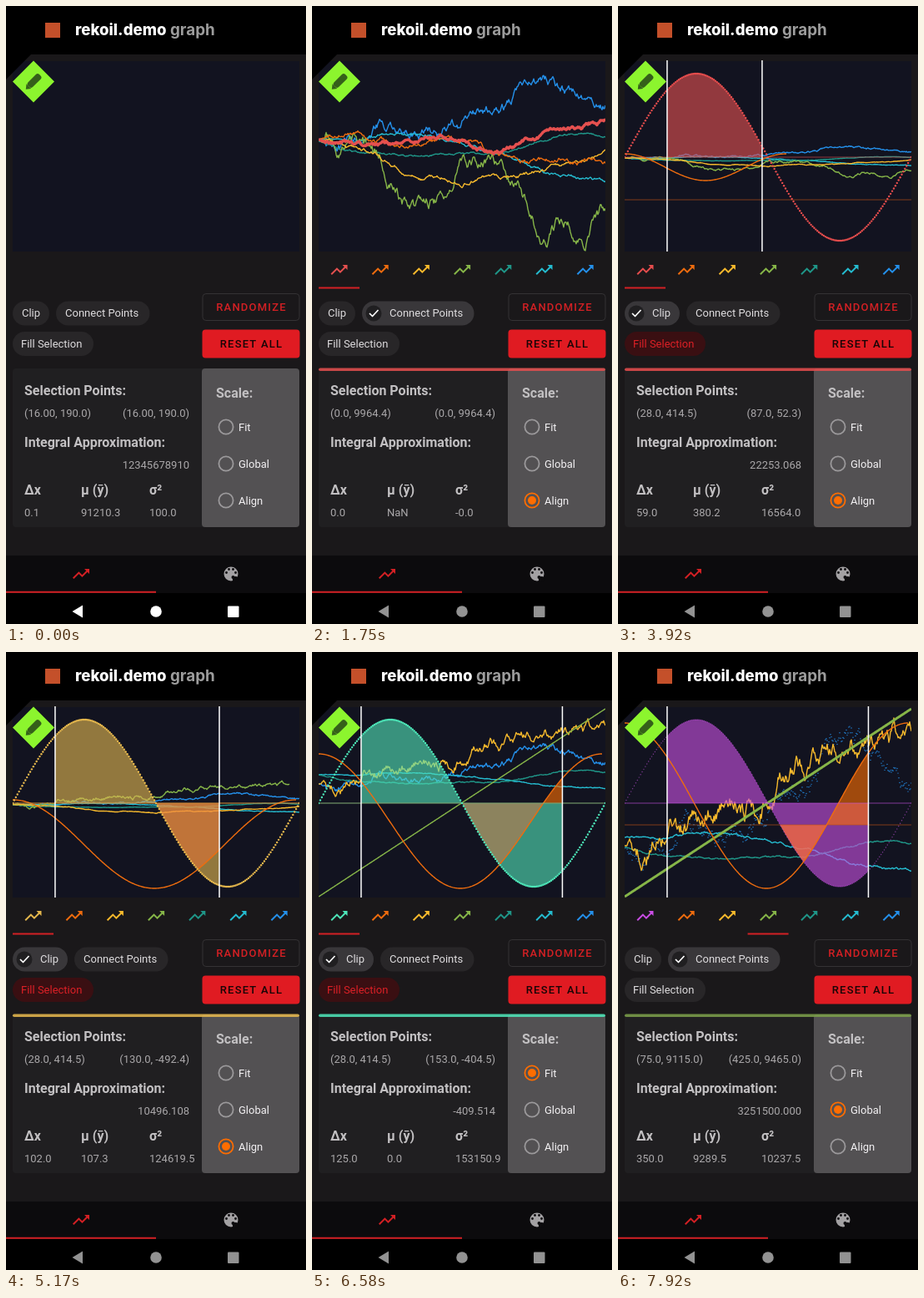
These frames come from a looping animation (360x740 px, 8000 ms). An HTML page with a canvas:

```html
<!DOCTYPE html>
<html lang="en">
<head>
<meta charset="utf-8">
<title>Graph demo</title>
<style>
html, body { margin: 0; width: 100%; height: 100%; overflow: hidden; background: #000; }
canvas { display: block; width: 360px; height: 740px; }
</style>
</head>
<body>
<canvas id="stage"></canvas>
<script>
const canvas = document.getElementById('stage');
const ctx = canvas.getContext('2d');
const dpr = window.devicePixelRatio || 1;
canvas.width = 360 * dpr;
canvas.height = 740 * dpr;

const LOOP = 8000, FPS = 12;
const LEFT = 8, TOP = 66, WIDTH = 344, BOTTOM = 294, MID = 181;
const RED = '#d32024';
const COLORS = ['#e5504f', '#ee6c0e', '#f6b92c', '#86b548', '#1f9688', '#25bcd0', '#2490ea'];
const ARROW = new Path2D('M16 6l2.29 2.29-4.88 4.88-4-4L2 16.59 3.41 18l6-6 4 4 6.3-6.29L22 12V6z');

// linear interpolation through time, value pairs
function key(t, ...k) {
  if (t <= k[0]) return k[1];
  for (let i = 2; i < k.length; i += 2) {
    if (t <= k[i]) return k[i - 1] + (k[i + 1] - k[i - 1]) * (t - k[i - 2]) / (k[i] - k[i - 2]);
  }
  return k[k.length - 1];
}

// random walk that follows evenly spaced knots
function walk(seed, amp, knots) {
  const out = [];
  let s = seed, v = 0;
  for (let i = 0; i <= WIDTH; i++) {
    s = (s * 16807) % 2147483647;
    v = v * 0.92 + (s / 2147483647 - 0.5) * amp;
    const p = i / WIDTH * (knots.length - 1);
    const n = Math.min(Math.floor(p), knots.length - 2);
    out.push(knots[n] + (knots[n + 1] - knots[n]) * (p - n) + v * Math.min(1, i / 8));
  }
  return out;
}

const WALKS = [
  walk(1101, 3, [0, 4, 6, 8, 5, 0, -5, 1, 12, 13, 3, -6, -11, -17, -24]),
  walk(2203, 4, [0, -8, -5, 0, 4, 4, 2, 3, 12, 16, 22, 25, 22, 28, 30]),
  walk(3307, 3, [0, 5, 9, 20, 36, 48, 44, 52, 42, 48, 42, 38, 32, 24, 8]),
  walk(4409, 11, [0, 14, 10, 28, 72, 85, 76, 28, 34, 45, 72, 115, 95, 118, 82]),
  walk(5501, 1.5, [2, 10, 16, 18, 19, 20, 17, 18, 17, 14, 8, 0, -5, -7, -4]),
  walk(6607, 2.4, [0, 0, 2, -4, -8, -4, -2, 2, 12, 20, 28, 36, 42, 48, 50]),
  walk(7703, 8, [0, 8, -2, -20, -12, -6, -4, -18, -32, -40, -60, -74, -58, -46, -42])
];
const RISING = walk(8807, 17, [0, 18, -16, -24, -36, -48, -42, -62, -100, -92, -115, -140, -128, -128, -140]);

// [base, scale] of each walk under the Fit and Global scales
const FIT = [, , [158, 0.51], , [146, 0.6], [147, 0.33], [158, 0.63]];
const GLOBAL = [, , [232, 1], , [232, 0.8], [222, 0.8], [235, 1.9]];

function view(i, t) {
  const fit = FIT[i] || [MID, 0.185], all = GLOBAL[i] || fit;
  return {
    base: key(t, 1.33, 140 + i * 9, 1.58, 160, 2.33, 160, 2.58, MID, 5.9, 183, 6.25, fit[0], 7.33, fit[0], 7.6, all[0]),
    scale: key(t, 1.33, 0.7, 1.58, 1, 2.33, 1, 2.58, 0.185, 5.92, 0.185, 6.25, fit[1], 7.33, fit[1], 7.6, all[1])
  };
}

const sineAt = v => Math.fround(500 * Math.sin(v * Math.PI / 90));
const lineAt = v => 9040 + v;
const sineY = x => MID - 100 * Math.sin((x - LEFT) / WIDTH * 2 * Math.PI);

function stats(fn, a, b) {
  const n = b - a;
  let sum = 0, sq = 0, area = 0;
  for (let v = a; v < b; v++) {
    sum += fn(v);
    area = Math.fround(area + Math.fround((fn(v) + fn(v + 1)) / 2));
  }
  const mean = sum / n;
  for (let v = a; v < b; v++) sq += (fn(v) - mean) ** 2;
  const point = v => `(${v.toFixed(1)}, ${fn(v).toFixed(1)})`;
  const clean = v => Math.abs(v) < 0.05 ? '0.0' : v.toFixed(1);
  return {
    from: point(a), to: point(b), area: area.toFixed(3),
    dx: n.toFixed(1), mean: clean(mean), dev: (sq / (n - 1)).toFixed(1)
  };
}

function rect(x, y, w, h, color, r = 0) {
  ctx.fillStyle = color;
  ctx.beginPath();
  ctx.roundRect(x, y, w, h, r);
  ctx.fill();
}

function disc(x, y, r, color) {
  ctx.fillStyle = color;
  ctx.beginPath();
  ctx.arc(x, y, r, 0, 7);
  ctx.fill();
}

function poly(color, ...p) {
  ctx.fillStyle = color;
  ctx.beginPath();
  for (let i = 0; i < p.length; i += 2) ctx.lineTo(p[i], p[i + 1]);
  ctx.closePath();
  ctx.fill();
}

function text(s, x, y, color, size = 13, weight = 400, align = 'left', family = 'Roboto') {
  ctx.font = `${weight} ${size}px ${family}, sans-serif`;
  ctx.textAlign = align;
  ctx.fillStyle = color;
  ctx.fillText(s, x, y);
}

function curve(fn, x0, x1, color, width) {
  ctx.strokeStyle = color;
  ctx.lineWidth = width;
  ctx.beginPath();
  for (let x = x0; x <= x1; x++) ctx.lineTo(x, fn(x));
  ctx.stroke();
}

function dots(fn, count, color, r) {
  for (let i = 0; i <= count; i++) {
    const x = LEFT + i / count * WIDTH;
    disc(x, fn(x), r, color);
  }
}

function area(fn, x0, x1, axis, color) {
  ctx.fillStyle = color;
  ctx.beginPath();
  ctx.moveTo(x0, axis);
  for (let x = x0; x < x1; x++) ctx.lineTo(x, fn(x));
  ctx.lineTo(x1, fn(x1));
  ctx.lineTo(x1, axis);
  ctx.fill();
}

function arrow(x, y, color) {
  ctx.save();
  ctx.translate(x - 12, y - 12);
  ctx.fillStyle = color;
  ctx.fill(ARROW);
  ctx.restore();
}

function state(t) {
  const s = { t };
  s.loaded = t >= 0.24;
  s.sine = t >= 2.4;
  s.cos = t >= 3.6;
  s.second = t >= 7.4;
  s.clip = s.sine && !s.second;
  s.connect = (t >= 0.9 && !s.sine) || s.second;
  s.fill = s.clip;
  s.hue = Math.max(0, (t - 4.7) * 90);
  s.color = s.sine ? `hsl(${s.hue} 75% 60%)` : COLORS[0];
  s.soft = `hsl(${s.hue} 70% 60% / .62)`;
  s.strip = s.second ? '#7ca04a' : s.color;
  s.end = Math.round(key(t, 2.5, 31, 47 / 12, 87, 62 / 12, 130, 71 / 12, 153));
  s.endX = 59 + (s.end - 28) * 1.932;
  return s;
}

function drawChart(s) {
  const t = s.t;
  rect(LEFT, TOP, WIDTH, BOTTOM - TOP, '#121320');
  if (!s.loaded) return;
  ctx.save();
  ctx.beginPath();
  ctx.rect(LEFT, TOP - 1, WIDTH, BOTTOM - TOP + 1);
  ctx.clip();
  ctx.globalAlpha = key(t, 0.17, 0, 0.5, 1);

  for (let i = 6; i >= 0; i--) {
    if ((i === 0 && s.sine) || (i === 1 && s.cos) || (i === 3 && t >= 5.4)) continue;
    const rising = (i === 2 && t >= 5.4) || (i === 3 && t >= 4.3);
    const data = rising ? RISING : WALKS[i];
    const { base, scale } = view(i, t);
    const y = x => base + scale * data[Math.min(WIDTH, Math.round(x) - LEFT)];
    const stop = i === 3 && rising ? 340 : 352;
    if (t < 0.9 || (i === 6 && s.second)) dots(y, 344, COLORS[i], 0.7);
    else curve(y, LEFT, stop, COLORS[i], i === 0 ? 3.4 : 1.4);
  }

  if (t >= 5.4) {
    const y0 = key(t, 5.92, 188, 6.25, 293);
    const y1 = key(t, 5.92, 78, 6.25, 68);
    curve(x => y0 + (y1 - y0) * (x - LEFT) / WIDTH, LEFT, 352, COLORS[3], s.second ? 3 : 1.4);
  }

  const axis = key(t, 3.92, 232, 4.3, MID, 5.4, MID, 5.9, 207, 6.17, MID, 7.33, MID, 7.6, 207);
  const high = key(t, 5.2, 177, 5.9, 95, 6.17, 122, 7.33, 122, 7.6, 85);
  const low = key(t, 3.6, 188, 47 / 12, 209, 4.3, 283);
  const span = key(t, 3.6, 60, 47 / 12, 194, 4.3, 340);
  const cosY = x => (high + low) / 2 + (high - low) / 2 * Math.cos((x - LEFT) / span * 2 * Math.PI);

  if (s.sine) {
    area(sineY, 59, s.endX, MID, s.soft);
    if (t >= 4.3 && s.endX > MID) {
      const base = s.second ? axis : MID;
      const inner = x => {
        const y = cosY(x);
        return y > base ? Math.max(base, Math.min(y, sineY(x))) : base;
      };
      area(inner, MID, s.endX, base, `rgba(255,110,50,${s.second ? 0.7 : 0.42})`);
      area(x => Math.min(base, cosY(x)), MID, s.endX, base, 'rgba(255,110,0,.6)');
    }
  }
  if (s.cos) {
    rect(LEFT, axis - 0.5, WIDTH, 1, 'rgba(190,80,20,.65)');
    curve(cosY, LEFT, Math.min(352, LEFT + span), COLORS[1], 1.4);
  }
  if (s.sine) {
    rect(LEFT, MID - 0.5, WIDTH, 1, s.soft);
    dots(sineY, 180, s.second ? s.soft : s.color, s.second ? 0.7 : 1.2);
    rect(58.2, TOP - 1, 1.5, 230, '#fff');
    rect(s.endX - 0.8, TOP - 1, 1.5, 230, '#fff');
  }
  ctx.restore();
}

function drawHeader() {
  rect(0, 0, 360, 58, '#000');
  rect(47, 20, 18, 18, '#c4502a');
  text('rekoil.demo', 83, 34.5, '#fff', 18.6, 800, 'left', 'Inter');
  text('graph', 197, 34.5, '#9c9c9c', 18.8, 700, 'left', 'Inter');
  poly('#000', 0, 57, 31, 57, 0, 88);
  poly('#8cf52e', 33, 65.5, 58, 90.5, 33, 115.5, 8, 90.5);
  ctx.save();
  ctx.translate(33, 90.5);
  ctx.rotate(-Math.PI / 4);
  rect(-8, -4, 19, 8, '#35601a', 3);
  poly('#35601a', -8, -4, -13, 0, -8, 4);
  ctx.restore();
}

function drawTabs(s) {
  if (!s.loaded) return;
  const t = s.t;
  if (t >= 7.24 && t < 7.45) {
    ctx.save();
    ctx.beginPath();
    ctx.rect(8, 294, 344, 44);
    ctx.clip();
    disc(181, 316, 27, '#3c3b3d');
    ctx.restore();
  }
  COLORS.forEach((c, i) => arrow(32.5 + i * 49.2, 316, i ? c : s.color));
  const at = key(t, 86 / 12, 0, 87 / 12, 1, 88 / 12, 2.4, 89 / 12, 3);
  rect(8 + at * 49.2, 336.5, 49, 2, RED);
}

function chip(label, x, y, w, on) {
  const full = w + (on ? 22 : 0);
  rect(x, y, full, 29, on ? '#39373a' : '#282628', 14.5);
  if (on) {
    disc(x + 14, y + 14.5, 9.5, '#201f21');
    ctx.strokeStyle = '#fff';
    ctx.lineWidth = 1.7;
    ctx.beginPath();
    ctx.moveTo(x + 9, y + 14.5);
    ctx.lineTo(x + 12.5, y + 18);
    ctx.lineTo(x + 19.5, y + 10.5);
    ctx.stroke();
  }
  text(label, x + (on ? 33 : 11), y + 18.7, '#dedcde');
  return x + full + 8;
}

function drawButtons(s) {
  const x = chip('Clip', 8, 353.5, 44, s.clip);
  chip('Connect Points', x, 353.5, 112.5, s.connect);
  rect(8, 390, 97, 29, s.fill ? '#3a0f12' : '#282628', 14.5);
  text('Fill Selection', 18, 408.7, s.fill ? '#dc2026' : '#dedcde');

  ctx.strokeStyle = '#343234';
  ctx.lineWidth = 1;
  ctx.beginPath();
  ctx.roundRect(236, 344.5, 116, 32, 4);
  ctx.stroke();
  rect(235.5, 387.5, 117, 34, '#e01b22', 4);
  ctx.letterSpacing = '1.2px';
  text('RANDOMIZE', 294.5, 365.3, RED, 13, 500, 'center');
  text('RESET ALL', 294.5, 409.3, '#180506', 13, 500, 'center');
  ctx.letterSpacing = '0px';
}

function radio(label, y, on, off, t) {
  // on and off are the times at which the choice is made and lost
  const picked = t >= on && t < off;
  if (t >= on && t < on + 0.08) {
    disc(264, y, 8.7, '#ff6d00');
    disc(264, y, 1, '#6b3a12');
  } else {
    ctx.strokeStyle = picked ? '#ff6d00' : '#9b999b';
    ctx.lineWidth = 1.8;
    ctx.beginPath();
    ctx.arc(264, y, 8.6, 0, 7);
    ctx.stroke();
    if (picked) disc(264, y, 5, '#ff6d00');
    else if (t >= off && t < off + 0.08) disc(264, y, 6.5, '#9b999b');
  }
  text(label, 279, y + 4.7, '#f2f0f2');
}

function drawCard(s) {
  rect(8, 434, 344, 190, '#201f21', 4);
  rect(235, 434, 117, 190, '#535153', 4);
  if (s.loaded) {
    ctx.globalAlpha = 0.86;
    rect(8, 433.5, 344, 3.5, s.strip, 2);
    ctx.globalAlpha = 1;
  }

  let d = { from: '(16.00, 190.0)', to: '(16.00, 190.0)', area: '12345678910', dx: '0.1', mean: '91210.3', dev: '100.0' };
  if (s.second) d = stats(lineAt, 75, 425);
  else if (s.sine) d = stats(sineAt, 28, s.end);
  else if (s.loaded) d = { from: '(0.0, 9964.4)', to: '(0.0, 9964.4)', area: '', dx: '0.0', mean: 'NaN', dev: '-0.0' };

  const head = '#c2c0c2', body = '#aaa8aa';
  const title = (label, x, y) => text(label, x, y, head, 16, 700);
  title('Selection Points:', 22, 466);
  title('Integral Approximation:', 22, 528);
  title('Δx', 22, 585);
  title('μ (ȳ)', 90, 585);
  title('σ²', 172, 585);
  title('Scale:', 252, 469);
  text(d.from, 22, 492, body);
  text(d.to, 220, 492, body, 13, 400, 'right');
  text(d.area, 220, 554, body, 13, 400, 'right');
  text(d.dx, 22, 611, body);
  text(d.mean, 90, 611, body);
  text(d.dev, 172, 611, body);

  const fit = 71 / 12 - 0.01, all = 7.4;
  radio('Fit', 504, fit, all, s.t);
  radio('Global', 548, all, 99, s.t);
  radio('Align', 592, 1.33, fit, s.t);
}

function drawBottom(s) {
  rect(0, 658, 360, 45, '#0c0b0d');
  arrow(90, 680, RED);
  disc(270, 680, 8.5, '#a3a1a3');
  disc(275.5, 686.5, 3.6, '#0c0b0d');
  disc(272.5, 684, 2, '#0c0b0d');
  for (const [x, y] of [[-5.5, -1.5], [-2.5, -5.5], [2.5, -5.5], [5.5, -1.5]]) disc(270 + x, 680 + y, 1.4, '#0c0b0d');
  rect(0, 700.8, 180, 2, RED);

  rect(0, 703, 360, 37, '#000');
  const g = Math.round(key(s.t, 0.08, 255, 1, 146));
  const nav = `rgb(${g},${g},${g})`;
  poly(nav, 79.5, 725, 92, 717.5, 92, 732.5);
  disc(180, 725, 6.8, nav);
  rect(266, 718.5, 13.5, 13.5, nav, 1);
}

function draw(ms) {
  const step = Math.floor((ms % LOOP) / 1000 * FPS + 0.01);
  const s = state(step / FPS);
  ctx.setTransform(dpr, 0, 0, dpr, 0, 0);
  ctx.lineJoin = 'round';
  rect(0, 0, 360, 740, '#1a181a');
  drawChart(s);
  drawHeader();
  drawTabs(s);
  drawButtons(s);
  drawCard(s);
  drawBottom(s);
}

const start = performance.now();
function tick() {
  draw(performance.now() - start);
  requestAnimationFrame(tick);
}
tick();
</script>
</body>
</html>
```
